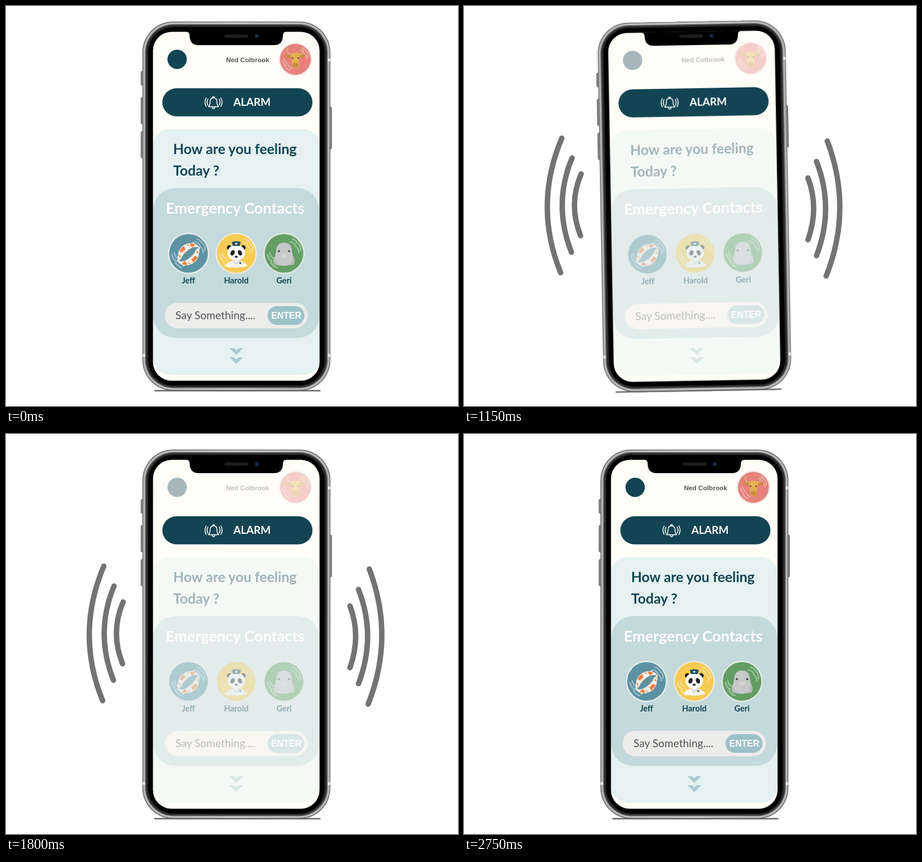
These frames come from a looping animation (795x705 px, 2.8 s). An HTML page:

```html
<!DOCTYPE html>
<html lang="en">
<head>
<meta charset="utf-8">
<title>Alarm</title>
<style>
  html, body { margin: 0; width: 100%; height: 100%; overflow: hidden; background: #fff; }
  svg { display: block; width: 795px; height: 705px; }
  text { font-family: Lato, sans-serif; font-weight: 700; fill: #134452; }
  .arial { font-family: "Liberation Sans", Arial, sans-serif; }
  .white { fill: #fff; }
  .mid { text-anchor: middle; }

  .phone { transform-origin: 405px 353px; animation: shake 2.8s infinite cubic-bezier(.37, 0, .63, 1); }
  .dim { animation: dim 2.8s infinite linear; }
  .waves { animation: buzz 2.8s infinite step-end; fill: none; stroke: #737373; stroke-width: 9.5; stroke-linecap: round; }

  @keyframes dim {
    0% { opacity: 1; }
    20.5%, 78.57% { opacity: .38; }
    96.43%, 100% { opacity: 1; }
  }
  @keyframes shake {
    0%, 21.43% { transform: rotate(0); }
    30.95% { transform: rotate(.5deg); }
    40.48% { transform: rotate(-1.03deg); }
    50% { transform: rotate(1.03deg); }
    59.52% { transform: rotate(-1.03deg); }
    69.05% { transform: rotate(1.03deg); }
    78.57%, 100% { transform: rotate(0); }
  }
  @keyframes buzz {
    0% { visibility: hidden; }
    23.2% { visibility: visible; }
    80.3%, 100% { visibility: hidden; }
  }
</style>
</head>
<body>
<svg viewBox="0 0 795 705" xmlns="http://www.w3.org/2000/svg">
  <defs>
    <clipPath id="screen"><rect x="258.500" y="45.500" width="293" height="615" rx="33"/></clipPath>
    <linearGradient id="steel" x1="0" x2="1" y1="0" y2="0">
      <stop offset="0" stop-color="#b4b4b1"/>
      <stop offset=".5" stop-color="#cacac6"/>
      <stop offset="1" stop-color="#b4b4b1"/>
    </linearGradient>
    <g id="fern" fill="none" stroke="#fff" stroke-width="2.600" stroke-linecap="round" opacity=".35">
      <path d="M11-20q6 0 9 6M15-25q6 1 9 7M21-12q5 4 5 11M25-17q5 4 4 12"/>
      <path d="M-29 2q1 8 8 12M-25-1q1 7 7 10M-23 16q4 7 11 9M-16 13q3 6 9 8"/>
    </g>
    <path id="chevron" d="M393 603h7.500l4.500 4 4.500-4h7.500l-12 12z" fill="#a9c9cf"/>
    <g id="koi">
      <path d="M-12 8l-8 8 1-12zM5-16l4-5 2 8z" fill="#f3dfd0"/>
      <path d="M-18 7C-20-8-8-18 5-18c7 0 12 3 14 8C12-13 4-10-3-4c-5 4-8 8-10 13z" fill="#f7efe8"/>
      <path d="M-16-4q3-6 8-9l3 6q-4 2-6 6zM2-17q6-1 10 2l-6 5zM-18 3l4 1-1 4z" fill="#ea8043"/>
      <path d="M-4-15l4-1 1 4zM-8 1l2-4 2 2z" fill="#ee9a66"/>
    </g>
  </defs>

  <g class="waves">
    <path d="M172 233Q122 352 170 470M190 268Q156 350 189 434M206 296Q183 350 205 405"/>
    <path d="M639 238Q684 357 637 476M620 274Q652 356 620 440M605 303Q625 356 605 412"/>
  </g>

  <g class="phone">
    <path d="M262 678H552" stroke="#666" stroke-width="2.500" stroke-linecap="round"/>
    <g fill="#8f8f8c" stroke="#555" stroke-width="1">
      <rect x="237.500" y="115" width="6" height="25" rx="2"/>
      <rect x="237.500" y="161" width="6" height="47" rx="2"/>
      <rect x="237.500" y="221" width="6" height="47" rx="2"/>
      <rect x="567" y="178" width="5.500" height="74" rx="2"/>
    </g>
    <rect x="240" y="27.500" width="330.500" height="650.500" rx="54" fill="#5c5c5c"/>
    <rect x="241.200" y="28.700" width="328.100" height="648.100" rx="53" fill="url(#steel)"/>
    <rect x="244.800" y="32" width="320.900" height="641.500" rx="50" fill="#5a5a5a"/>
    <rect x="246.500" y="33.800" width="317.500" height="638" rx="48" fill="#2a2a2a"/>
    <rect x="250" y="37" width="310.500" height="632" rx="45" fill="#000"/>
    <path d="M240.500 616h4M566 616h4M566 95h4" stroke="#eee" stroke-width="5"/>

    <g clip-path="url(#screen)">
      <rect x="258" y="45" width="294" height="616" fill="#fefdf8"/>

      <circle class="dim" cx="301" cy="94" r="17" fill="#134452"/>
      <text class="arial dim" x="387" y="99" font-size="11.600" style="fill:#555">Ned Colbrook</text>
      <g transform="translate(509 94)"><g class="dim">
        <circle r="29" fill="#f1dcd8"/>
        <circle r="27" fill="#e6817b"/>
        <use href="#fern" transform="scale(.78)"/>
        <path d="M-8-8q-7-2-6-11M8-8q7-2 6-11" fill="none" stroke="#d9b07c" stroke-width="2.500" stroke-linecap="round"/>
        <path d="M-8-8l-10-1q2 7 10 6zM8-8l10-1q-2 7-10 6z" fill="#c98f3c"/>
        <path d="M-8-10Q0-14 8-10L6 6Q7 16 0 16T-6 6z" fill="#e5b050"/>
        <path d="M-5 8Q0 4 5 8 6 15 0 15T-5 8z" fill="#c98f3c"/>
        <circle cx="-5" cy="-2" r="1.300" fill="#533"/>
        <circle cx="5" cy="-2" r="1.300" fill="#533"/>
      </g></g>

      <rect x="275" y="145" width="264" height="49.500" rx="24.700" fill="#134452"/>
      <g fill="none" stroke="#fff" stroke-width="1.500" stroke-linecap="round" stroke-linejoin="round">
        <path d="M356 177.500q3-3 3-9 0-6.500 6-6.500t6 6.500q0 6 3 9zM363.500 162v-2h3v2M362.500 178q.5 3 2.500 3t2.500-3"/>
        <path d="M355 164q-2.500 5.500 0 11M352 162q-4 7.500 0 15M375 164q2.500 5.500 0 11M378 162q4 7.500 0 15"/>
      </g>
      <text class="white" x="400" y="176" font-size="18.700">ALARM</text>

      <rect class="dim" x="259" y="217" width="292" height="433" rx="28" fill="#e6f1f1"/>
      <g class="dim" font-size="24.500">
        <text x="294" y="261">How are you feeling</text>
        <text x="294" y="299">Today ?</text>
      </g>

      <rect class="dim" x="259" y="321" width="292" height="264" rx="38" fill="#c3d9db"/>
      <text class="white mid" x="403" y="365.500" font-size="26.800">Emergency Contacts</text>

      <g transform="translate(321 436)"><g class="dim">
        <circle r="36.500" fill="#e6ebe9"/>
        <circle r="34" fill="#5c92a2"/>
        <use href="#fern"/>
        <use href="#koi"/>
        <use href="#koi" transform="translate(0 3) rotate(180)"/>
      </g></g>

      <g transform="translate(405 436)"><g class="dim">
        <circle r="36.500" fill="#ece9dc"/>
        <circle r="34" fill="#f7cb52"/>
        <use href="#fern"/>
        <path d="M-20 22Q-12 12 0 12T20 22Q12 25 0 25T-20 22z" fill="#f4f4f2"/>
        <circle cx="-12" cy="-10" r="4.500" fill="#222"/>
        <circle cx="12" cy="-10" r="4.500" fill="#222"/>
        <ellipse cy="-1" rx="15.500" ry="14" fill="#fbfbf8"/>
        <ellipse cx="-6.500" cy="-1" rx="3.500" ry="5" fill="#222" transform="rotate(25 -6.500 -1)"/>
        <ellipse cx="6.500" cy="-1" rx="3.500" ry="5" fill="#222" transform="rotate(-25 6.500 -1)"/>
        <ellipse cy="6" rx="2.800" ry="1.800" fill="#222"/>
        <path d="M-8-20Q0-23 8-20l-2 7H-6z" fill="#235260"/>
        <path d="M-2-17h4M0-19v4" stroke="#fff" stroke-width="1.300"/>
        <path d="M-5 13l5 6 5-6" fill="none" stroke="#c9cfd0" stroke-width="1.500"/>
        <circle cx="7" cy="17" r="1.800" fill="#235260"/>
      </g></g>

      <g transform="translate(489 436)"><g class="dim">
        <circle r="36.500" fill="#e4eae2"/>
        <circle r="34" fill="#639d63"/>
        <use href="#fern"/>
        <path d="M-13 1Q-22 10-17 20L-8 21zM13 1Q22 10 17 20L8 21z" fill="#b6b8b8"/>
        <path d="M-14-4Q-13-19 0-19T14-4Q20 22 0 22T-14-4z" fill="#c6c8c8"/>
        <path d="M-5 1Q0-2 5 1L4 8H-4z" fill="#d2d3d2"/>
        <circle cx="-9" cy="-4" r="1.700" fill="#333"/>
        <circle cx="9" cy="-4" r="1.700" fill="#333"/>
      </g></g>

      <g class="mid dim" font-size="14.300">
        <text x="321" y="488.500">Jeff</text>
        <text x="405" y="488.500">Harold</text>
        <text x="489" y="488.500">Geri</text>
      </g>

      <rect x="279.500" y="523.500" width="251" height="44" rx="22" fill="#fefdf8"/>
      <g class="dim">
        <rect x="279" y="523" width="252" height="45" rx="22.500" fill="#ececeb"/>
        <text x="298" y="552" font-size="19" style="font-weight:400;fill:#555">Say Something....</text>
        <rect x="460" y="529" width="65" height="33" rx="16.500" fill="#9cc1c9"/>
      </g>
      <text class="arial white mid" x="493" y="551.300" font-size="15.600">ENTER</text>

      <g class="dim">
        <use href="#chevron"/>
        <use href="#chevron" y="16"/>
      </g>
    </g>

    <path d="M317 45q6 1 6 7 0 17 16 17H471q16 0 16-17 0-6 6-7z" fill="#000"/>
    <rect x="384" y="50" width="42" height="6" rx="3" fill="#1d1d1f"/>
    <circle cx="441" cy="53" r="4.500" fill="#10141f"/>
    <circle cx="441" cy="53" r="2" fill="#24406f"/>
  </g>
</svg>
</body>
</html>
```
